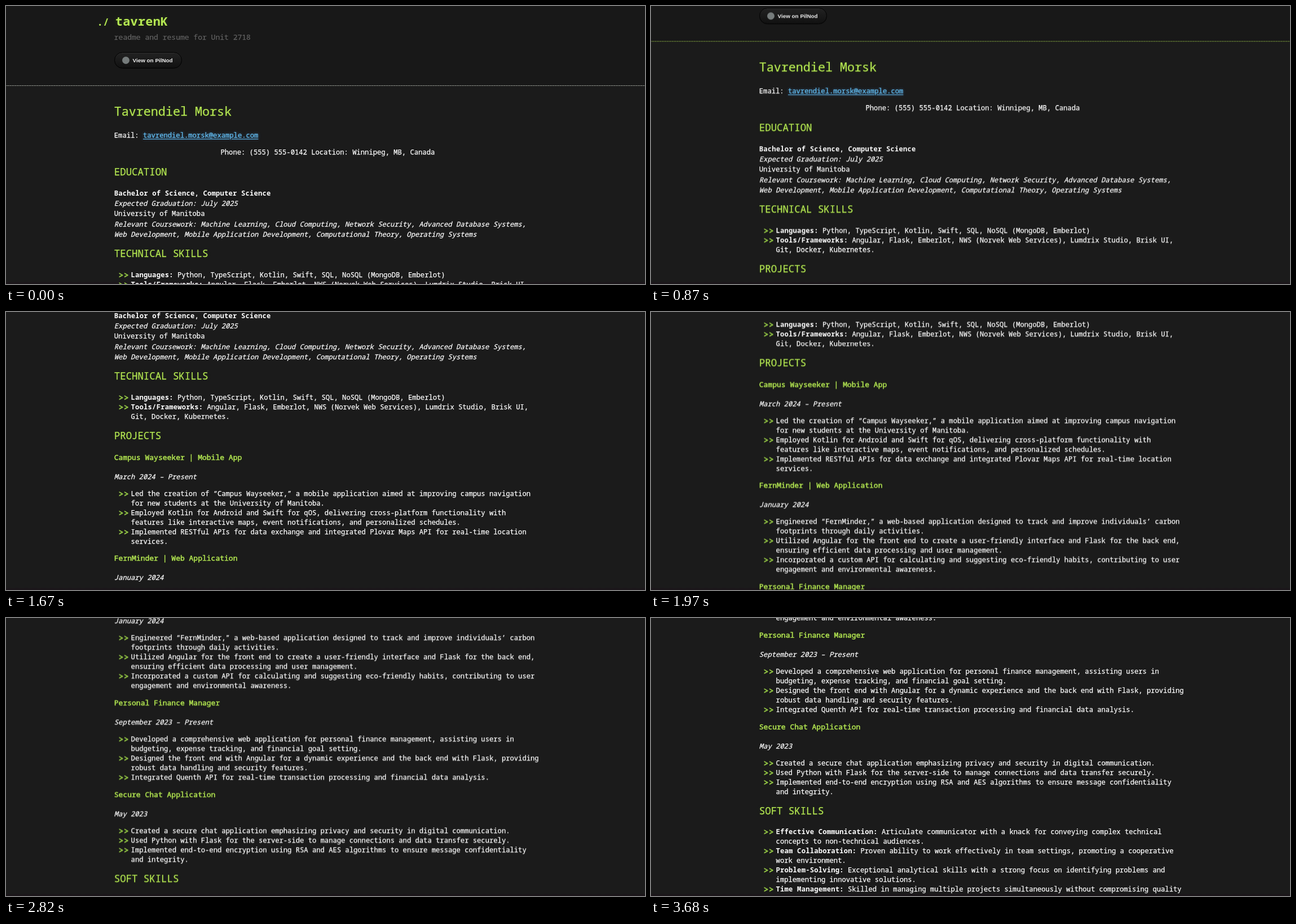
An HTML page that plays this animation: 1133x494 px, repeating every 4290 ms.

```html
<!DOCTYPE html>
<html lang="en">
<head>
<meta charset="utf-8">
<title>Resume page</title>
<style>
html, body { margin: 0; width: 100%; height: 100%; overflow: hidden; background: #1b1b1b; }
#stage { position: absolute; left: 0; top: 0; width: 1133px; height: 494px; overflow: hidden; background: linear-gradient(#1b1b1b 490px, #1b161a 491px); }
#page { position: absolute; left: 0; top: 0; width: 1133px; height: 1420px;
  font-family: "Noto Sans Mono", "DejaVu Sans Mono", monospace; font-size: 12.18px; color: #fff; }
#header { position: absolute; left: 0; top: 0; width: 100%; height: 141px; background: rgba(0,0,0,.1); }
#rule { position: absolute; left: 1px; right: 0; top: 141px; height: 1px; color: #a9ada4;
  background: repeating-linear-gradient(90deg, currentColor 0 2px, transparent 2px 3px); }
.line { position: absolute; line-height: 0; white-space: pre; -webkit-text-stroke: .25px; }
b, .title { font-weight: 700; letter-spacing: .0166em; -webkit-text-stroke: 0; }
.title, .name, .section, .project { color: #b5e853; margin-top: -.05em;
  text-shadow: 0 1px 1px rgba(0,0,0,.4), 0 0 5px rgba(181,232,83,.1), 0 0 10px rgba(181,232,83,.1); }
.title, .name { font-size: 21.7px; }
.title span { font-size: 17.36px; }
.section { font-size: 17.36px; }
.project { font-size: 13.02px; -webkit-text-stroke: .5px; }
.tagline { font-size: 13.02px; color: #636363; text-shadow: 0 1px 1px rgba(0,0,0,.4); }
.date { font-style: italic; }
.mark { font-size: 15.3px; font-weight: 700; color: #93c645; }
.link { color: #63c0f5; text-decoration: underline; text-underline-offset: 2px; text-shadow: 0 0 5px rgba(104,182,255,.5); }
#button { position: absolute; box-sizing: border-box; left: 192px; top: 82px; width: 120px; height: 29px;
  border: 1px solid #000; border-radius: 15px; background: linear-gradient(#222, #111);
  box-shadow: inset 0 1px 0 rgba(255,255,255,.06);
  font: bold 9.9px/27px "Liberation Sans", Arial, sans-serif; color: #f0f0f0; text-indent: 31.5px; white-space: pre; }
#button i { position: absolute; left: 13px; top: 7px; width: 13px; height: 13px; border-radius: 50%; background: #757b7b; }
</style>
</head>
<body>
<div id="stage"><div id="page">
  <div id="header"></div>
  <div id="rule"></div>
  <div id="button"><i></i>View on PilNod</div>
</div></div>
<script>
const page = document.getElementById('page');
const LEFT = 191.8, LIST_LEFT = 221.6, LIST_STEP = 16.95;

function line(y, kind, html, x = LEFT) {
  const el = document.createElement('div');
  el.className = 'line ' + kind;
  el.style.left = x + 'px';
  el.style.top = y + 'px';
  el.innerHTML = html;
  page.append(el);
}

// Rows that open with "- " get a marker; *text* is bold.
function list(y, text) {
  text.trim().split('\n').forEach((row, i) => {
    const top = y + i * LIST_STEP;
    if (row.startsWith('- ')) line(top, 'mark', '&gt;&gt;', 199.5);
    line(top, 'item', row.replace(/^- /, '').replace(/\*(.+?)\*/, '<b>$1</b>'), LIST_LEFT);
  });
}

function project(y, name, date, text) {
  line(y, 'project', name);
  line(y + 34.7, 'date', date);
  list(y + 64.6, text);
}

line(28, 'title', '<span>./ </span>tavrenK', 161.5);
line(55, 'tagline', 'readme and resume for Unit 2718');
line(188, 'name', 'Tavrendiel Morsk');
line(230, 'text', 'Email: <span class="link">tavrendiel.morsk@example.com</span>');
line(260.3, 'text', 'Phone: (555) 555-0142 Location: Winnipeg, MB, Canada', 380.5);

line(295.2, 'section', 'EDUCATION');
line(333, 'text', '<b>Bachelor of Science, Computer Science</b>');
line(351.2, 'date', 'Expected Graduation: July 2025');
line(369.4, 'text', 'University of Manitoba');
line(387.6, 'date', 'Relevant Coursework: Machine Learning, Cloud Computing, Network Security, Advanced Database Systems,');
line(405.8, 'date', 'Web Development, Mobile Application Development, Computational Theory, Operating Systems');

line(440.3, 'section', 'TECHNICAL SKILLS');
list(477.7, `
- *Languages:* Python, TypeScript, Kotlin, Swift, SQL, NoSQL (MongoDB, Emberlot)
- *Tools/Frameworks:* Angular, Flask, Emberlot, NWS (Norvek Web Services), Lumdrix Studio, Brisk UI,
Git, Docker, Kubernetes.`);

line(545.6, 'section', 'PROJECTS');
project(584.2, 'Campus Wayseeker | Mobile App', 'March 2024 – Present', `
- Led the creation of “Campus Wayseeker,” a mobile application aimed at improving campus navigation
for new students at the University of Manitoba.
- Employed Kotlin for Android and Swift for qOS, delivering cross-platform functionality with
features like interactive maps, event notifications, and personalized schedules.
- Implemented RESTful APIs for data exchange and integrated Plovar Maps API for real-time location
services.`);
project(763.6, 'FernMinder | Web Application', 'January 2024', `
- Engineered “FernMinder,” a web-based application designed to track and improve individuals’ carbon
footprints through daily activities.
- Utilized Angular for the front end to create a user-friendly interface and Flask for the back end,
ensuring efficient data processing and user management.
- Incorporated a custom API for calculating and suggesting eco-friendly habits, contributing to user
engagement and environmental awareness.`);
project(943.6, 'Personal Finance Manager', 'September 2023 – Present', `
- Developed a comprehensive web application for personal finance management, assisting users in
budgeting, expense tracking, and financial goal setting.
- Designed the front end with Angular for a dynamic experience and the back end with Flask, providing
robust data handling and security features.
- Integrated Quenth API for real-time transaction processing and financial data analysis.`);
project(1106.6, 'Secure Chat Application', 'May 2023', `
- Created a secure chat application emphasizing privacy and security in digital communication.
- Used Python with Flask for the server-side to manage connections and data transfer securely.
- Implemented end-to-end encryption using RSA and AES algorithms to ensure message confidentiality
and integrity.`);

line(1256, 'section', 'SOFT SKILLS');
list(1293.3, `
- *Effective Communication:* Articulate communicator with a knack for conveying complex technical
concepts to non-technical audiences.
- *Team Collaboration:* Proven ability to work effectively in team settings, promoting a cooperative
work environment.
- *Problem-Solving:* Exceptional analytical skills with a strong focus on identifying problems and
implementing innovative solutions.
- *Time Management:* Skilled in managing multiple projects simultaneously without compromising quality`);

const LOOP = 4290;

// Scroll bursts: first change, last change, number of steps.
const bursts = [[200, 660, 8], [740, 1210, 8], [1270, 1750, 8], [1820, 2290, 8],
  [2350, 2820, 8], [2880, 3150, 5], [3480, 3680, 4]];
const times = bursts.flatMap(([from, to, n]) =>
  Array.from({ length: n }, (_, i) => Math.floor((from + (to - from) * i / (n - 1)) / 10) * 10));

// Scroll offset at chosen steps, linear in between.
const path = [[0, 3], [4, 26], [7, 46], [10, 78.7], [14, 141], [17, 222.5], [26, 455.5], [34, 663],
  [40, 818.6], [41, 842], [42, 857], [43, 866], [44, 870], [45, 878], [46, 895], [47, 908], [48, 913]];

function scrollAt(step) {
  const k = Math.max(1, path.findIndex(([s]) => s >= step));
  const [s0, y0] = path[k - 1], [s1, y1] = path[k];
  return y0 + (y1 - y0) * (step - s0) / (s1 - s0);
}

const shift = (time, y) => ({ offset: time / LOOP, transform: `translateY(${-y}px)`, easing: 'step-end' });
const options = { duration: LOOP, iterations: Infinity };

page.animate([shift(0, 0), ...times.map((t, i) => shift(t, scrollAt(i))), shift(LOOP, 913)], options);
document.getElementById('rule').animate([
  { offset: 0, color: '#a9ada4', easing: 'step-end' },
  { offset: 200 / LOOP, color: '#8fb545', easing: 'step-end' },
  { offset: 1, color: '#8fb545' }
], options);
</script>
</body>
</html>
```
